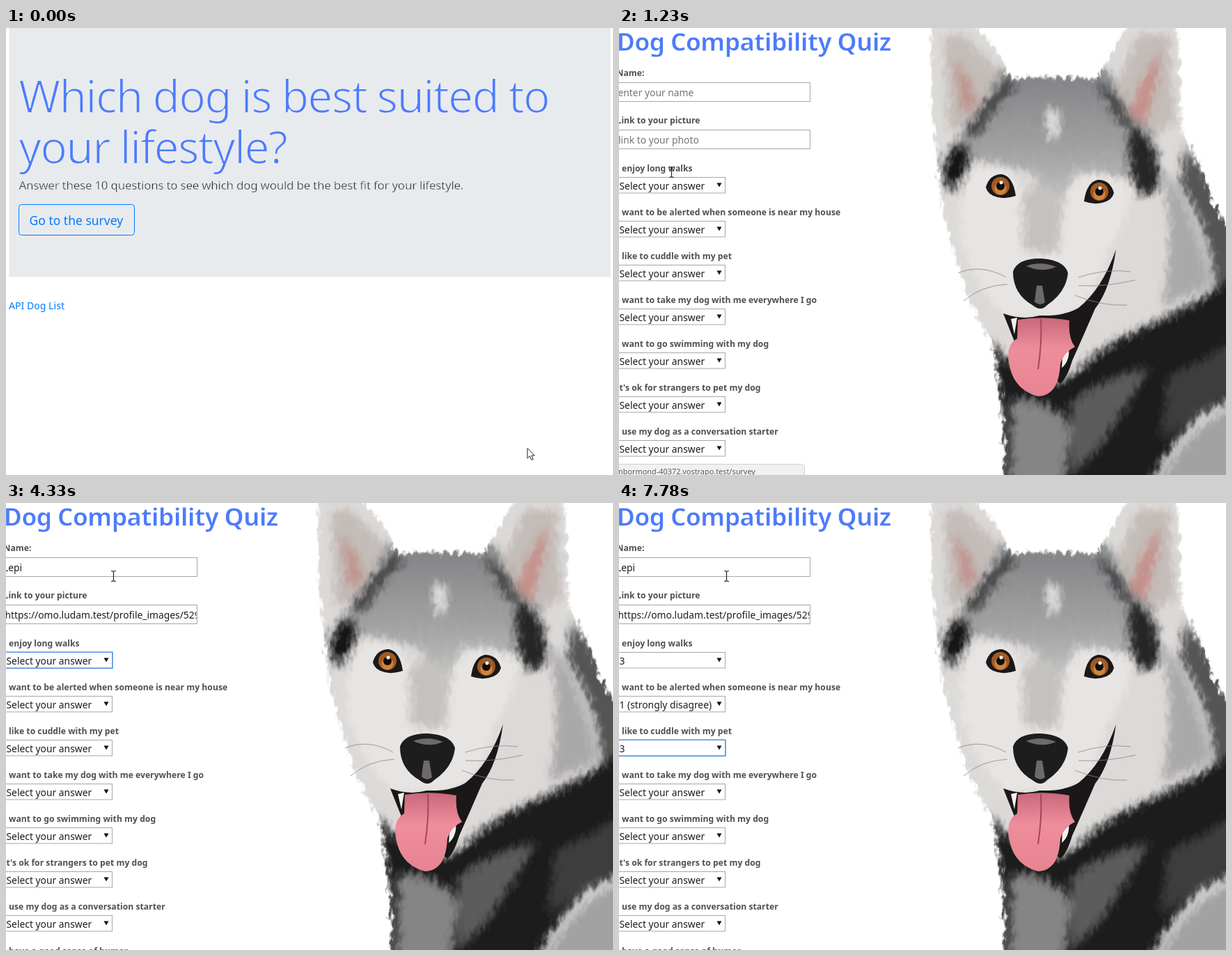
Write an HTML page that moves like this. It is 872 by 642 pixels and loops after 8000 ms.

```html
<!DOCTYPE html>
<html lang="en">
<head>
<meta charset="utf-8">
<title>Dog quiz</title>
<style>
  html, body { margin: 0; width: 100%; height: 100%; overflow: hidden; background: #fff; }
  svg { position: absolute; left: 0; top: 0; width: 872px; height: 642px; }
  text { font-family: "Noto Sans", "Open Sans", sans-serif; white-space: pre; }
  #dog { will-change: transform; }
  /* An outline in the background colour gives the lighter weights. */
  .hero { font-size: 65px; letter-spacing: -2.25px; fill: #4c7bff; stroke: #e8ebee; stroke-width: 2.1; }
  .lead { font-size: 17px; letter-spacing: -.26px; fill: #212529; stroke: #e8ebee; stroke-width: .5; }
  .cta { font-size: 17.5px; }
  .link { font-size: 14.1px; fill: #007bff; }
  .title { font-size: 36px; font-weight: 700; letter-spacing: -.95px; fill: #4c7bfb; stroke: #fff; stroke-width: .9; }
  .label { font-size: 12.2px; font-weight: 700; fill: #505050; }
  .value { font-size: 13.85px; fill: #1c1c1c; }
  .hint { fill: #757575; }
  .status { font-size: 10.9px; fill: #5a5a5a; }
  .box { fill: #fff; stroke: #a6a6a6; }
  .focus { fill: none; stroke: #5b95ea; stroke-width: 1.6; }
</style>
</head>
<body>
<svg id="dog" viewBox="0 0 872 642" data-at="1230 8000">
  <defs>
    <path id="shape" d="M450-20H490Q540 15 563 73Q625 68 689 73Q705 30 745-20H798Q809 60 808 152Q838 190 848 240Q870 285 900 330V680H556Q556 570 537 455Q500 395 485 335Q462 270 456 180Q444 90 450-20Z"/>
    <clipPath id="outline"><use href="#shape"/></clipPath>
    <filter id="fur" filterUnits="userSpaceOnUse" x="420" y="-30" width="490" height="710">
      <feGaussianBlur stdDeviation="1.6" result="soft"/>
      <feTurbulence type="fractalNoise" baseFrequency=".14 .07" numOctaves="3" seed="4"/>
      <feDisplacementMap in="soft" scale="17" xChannelSelector="R" yChannelSelector="G"/>
    </filter>
    <filter id="blur" filterUnits="userSpaceOnUse" x="420" y="-30" width="490" height="710">
      <feGaussianBlur stdDeviation="6"/>
    </filter>
    <linearGradient id="brow" x1="0" y1="0" x2="0" y2="1">
      <stop offset="0" stop-color="#808183"/>
      <stop offset=".5" stop-color="#a2a2a3"/>
      <stop offset="1" stop-color="#d2d0ce"/>
    </linearGradient>
    <linearGradient id="tongue" x1="0" y1="0" x2="0" y2="1">
      <stop offset="0" stop-color="#c9687a"/>
      <stop offset=".4" stop-color="#ee8d9b"/>
      <stop offset="1" stop-color="#e88492"/>
    </linearGradient>
  </defs>
  <g filter="url(#fur)">
    <use href="#shape" fill="#dcdad8"/>
    <g clip-path="url(#outline)"><g filter="url(#blur)">
      <path fill="url(#brow)" d="M550 60H700L770 155L762 222L700 210L655 205L625 290L598 210L545 196L500 190L485 165Z"/>
      <path fill="#c3bcb8" d="M468 10H495L545 60L505 135L472 150Z"/>
      <path fill="#c0938c" d="M478 45Q508 70 514 110L490 125Q492 80 478 45Z"/>
      <path fill="#c3bcb8" d="M745 10H790L798 140L765 150L712 90Z"/>
      <path fill="#c58f88" d="M778 30Q745 80 735 125L754 140Q772 95 778 30Z"/>
      <path fill="#414143" d="M555 72L572 82Q540 115 515 158L492 150Q522 115 555 72Z"/>
      <path fill="#414143" d="M684 76L715 95L745 155L722 140Q700 112 684 76Z"/>
      <path fill="#161617" d="M488 160Q516 172 500 205L482 238Q458 215 470 185Z"/>
      <path fill="#252526" d="M732 140Q780 150 776 232L750 242Q724 210 732 140Z"/>
      <path fill="#f2f0ee" d="M616 118H630L628 158H619Z"/>
      <path fill="#e7e5e3" d="M505 205Q545 180 575 225Q590 280 602 295Q625 260 655 220Q700 190 735 235Q730 280 700 325Q680 400 640 415H560Q520 390 492 310Q485 240 505 205Z"/>
      <path fill="#c4c2c0" d="M580 235Q605 215 640 240L632 322H580Z"/>
      <path fill="#555557" d="M812 170Q850 215 900 310V400L855 370Q850 290 806 225Z"/>
      <path fill="#aaa9a9" d="M780 200Q830 260 850 370L780 400Q800 300 780 200Z"/>
      <path fill="#1b1b1c" d="M900 345Q830 395 765 425Q690 455 650 500Q600 530 530 445Q560 560 546 690H750Q790 570 900 510Z"/>
      <path fill="#858586" d="M566 535Q610 530 650 575L630 690H562Z"/>
      <path fill="#5b5b5c" d="M650 540Q700 500 760 490L690 600L650 640Z"/>
      <path fill="#a2a2a3" d="M900 540Q815 560 755 690H900Z"/>
      <path fill="#3d3d3e" d="M790 500Q840 480 900 440V530Q840 545 780 590Z"/>
    </g></g>
  </g>
  <path fill="#191717" d="M552 410Q580 420 604 413Q640 414 660 402Q694 375 714 318Q706 375 684 403Q668 440 651 478Q644 502 634 511L570 455Z"/>
  <path fill="#f4f1ec" d="M563 418L572 416L568 440ZM638 462Q648 455 646 470Q644 482 636 488Z"/>
  <path fill="url(#tongue)" d="M573 419Q610 413 647 420Q645 445 655 458Q640 465 634 482Q632 528 602 529Q566 520 560 480Q556 455 572 446Z"/>
  <path fill="none" stroke="#a8455b" stroke-width="2" d="M606 418Q608 450 602 490"/>
  <path fill="#1d1d1e" d="M566 350Q572 331 605 331Q640 333 645 352Q642 380 615 398Q606 408 594 398Q566 382 566 350Z"/>
  <path fill="#6f6a69" d="M585 342Q605 334 628 343Q608 352 585 342ZM600 370H608L612 394Q605 400 597 393Z"/>
  <g id="eyes"></g>
  <path fill="none" stroke="#888" stroke-width=".8" d="M558 368Q520 370 495 392M556 358Q520 338 487 352M660 370Q700 372 742 362M655 384Q695 400 730 398M660 358Q700 345 735 350"/>
</svg>

<svg id="page" viewBox="0 0 872 642">
  <defs><clipPath id="field"><path d="M0 140H273.5V180H0Z"/></clipPath></defs>
  <g data-at="0 1230">
    <rect x="4.5" y="-1" width="864" height="358.5" fill="#e8ebee"/>
    <text class="hero" x="18" y="122">Which dog is best suited to</text>
    <text class="hero" x="18" y="195">your lifestyle?</text>
    <text class="lead" x="18.5" y="232">Answer these 10 questions to see which dog would be the best fit for your lifestyle.</text>
    <g id="ring" data-at="930 1230">
      <rect x="17" y="252" width="169" height="47" rx="5" fill="none" stroke="#74b5f7" stroke-width="3"/>
    </g>
    <rect x="18.5" y="253.5" width="166" height="44" rx="4" fill="none" stroke="#007bff"/>
    <text class="cta" x="33.5" y="283" fill="#007bff">Go to the survey</text>
    <g data-at="540 1230">
      <rect x="18" y="253" width="167" height="45" rx="4" fill="#007bff"/>
      <text class="cta" x="33.5" y="283" fill="#fff">Go to the survey</text>
    </g>
    <text class="link" x="4" y="404">API Dog List</text>
  </g>

  <g data-at="1230 8000">
    <text class="title" x="-3.5" y="33">Dog Compatibility Quiz</text>
    <text class="label" x="-3.5" y="69">Name:</text>
    <rect class="box" x="-8.5" y="78.5" width="283" height="27"/>
    <text class="value hint" x="-1.5" y="97.5" data-at="0 2660">enter your name</text>
    <text class="value" id="name" x="-4" y="97.5"></text>
    <rect class="focus" x="-8" y="78.3" width="282.6" height="27.6" data-at="1760 3300"/>
    <text class="label" x="-3.5" y="137">Link to your picture</text>
    <rect class="box" x="-8.5" y="146.5" width="283" height="27"/>
    <text class="value hint" x="-1" y="165.5" data-at="0 3850">link to your photo</text>
    <g clip-path="url(#field)">
      <text class="value" x="-1.5" y="165.5" data-at="3850 8000">https://omo.ludam.test/profile_images/529</text>
    </g>
    <rect class="focus" x="-8" y="146.3" width="282.6" height="27.6" data-at="3300 4330"/>
    <g id="rows"></g>
  </g>

  <g data-at="540 1700">
    <path d="M-1 643V626.5H262Q266.5 626.5 266.5 631V643Z" fill="#f1f1f1" stroke="#d0d0d0"/>
    <text class="status" x="-1" y="641">nbormond-40372.vostrapo.test/survey</text>
  </g>

  <g id="pointer">
    <path data-at="0 540" fill="#fff" stroke="#222" d="M.5.5V15L4 11.8L6.4 17.3L8.8 16.2L6.4 11H11Z"/>
    <path data-at="540 1150" fill="#fff" stroke="#222" d="M-.5 1Q1.5-1 2.5 1V6Q8 6 9.5 8Q11 10 9 16H1L-4 9.5Q-4 7.5-.5 9.5Z"/>
    <path data-at="1150 8000" fill="none" stroke="#222" stroke-width="1.2" d="M-3.5-7.5Q0-7.5 0-6Q0-7.5 3.5-7.5M0-6V6M-3.5 7.5Q0 7.5 0 6Q0 7.5 3.5 7.5"/>
  </g>
</svg>

<script>
const LOOP = 8000, TICK = 610 / 9;
const $ = id => document.getElementById(id);

// Questions are scrolled sideways, so their first letter is cut off.
const questions = [
  [4, 'enjoy long walks'],
  [4, 'want to be alerted when someone is near my house'],
  [4, 'like to cuddle with my pet'],
  [4, 'want to take my dog with me everywhere I go'],
  [4, 'want to go swimming with my dog'],
  [.5, "t's ok for strangers to pet my dog"],
  [4, 'use my dog as a conversation starter'],
  [4, 'have a good sense of humor']
];

// Per row: focus start, answer time, focus end, answer.
const answers = [
  [4330, 6200, 6580, '3'],
  [6580, 7000, 7300, '1 (strongly disagree)'],
  [7300, 7780, LOOP, '3']
];

const value = (y, from, to, text) =>
  `<text class="value" x=".5" y="${y + 17.5}" data-at="${from} ${to}">${text}</text>`;

$('rows').innerHTML = questions.map(([x, text], i) => {
  const y = Math.round(213.5 + i * 63.15) + .5;
  const [focus, pick, blur, answer] = answers[i] || [LOOP, LOOP, LOOP, ''];
  return `<text class="label" x="${x}" y="${y - 9}">${text}</text>
    <rect class="box" x="-8.5" y="${y}" width="161" height="22.5"/>
    ${value(y, 0, pick, 'Select your answer')}${value(y, pick, LOOP, answer)}
    <path d="M140.5 ${y + 8}h7l-3.5 6z" fill="#111"/>
    <rect class="focus" x="-8" y="${y - .3}" width="161" height="23.2" data-at="${focus} ${blur}"/>`;
}).join('');

$('eyes').innerHTML = [[548, 227, 1], [690, 235, -1]].map(([x, y, side]) =>
  `<g transform="translate(${x} ${y})">
    <path transform="scale(${side} 1)" d="M-21 2Q-16-17 2-17Q18-14 22 14Q8 19-4 16Q-18 13-21 2Z" fill="#1b1817"/>
    <circle r="13" fill="#a05a26"/><circle cy="4" r="8.5" fill="#cf8440"/>
    <circle r="6" fill="#100c0a"/><circle cx="1" cy="-5" r="2.5" fill="#fff"/>
  </g>`).join('');

// time, x, y
const path = [
  [0, 748, 603], [280, 420, 380], [480, 170, 240], [680, 96, 266],
  [1080, 96, 266], [1154, 83, 251], [1222, 75, 207], [1440, 104, 150],
  [1760, 148, 104], [1999, 148, 104], [2000, 154, 105], [LOOP, 154, 105]
];

function pointerAt(t) {
  if (t < 70) t = 0;
  else if (t < 1800) t = 70 + Math.floor((t - 70) / TICK) * TICK;
  const i = path.findIndex(p => p[0] > t);
  const [t0, x0, y0] = path[i - 1], [t1, x1, y1] = path[i];
  const k = (t - t0) / (t1 - t0);
  return [Math.round(x0 + (x1 - x0) * k) + .5, Math.round(y0 + (y1 - y0) * k)];
}

const keyTimes = [2660, 2830, 2980, 3130];
const cues = [...document.querySelectorAll('[data-at]')].map(el => [el, ...el.dataset.at.split(' ').map(Number)]);

function draw(t) {
  for (const [el, from, to] of cues) el.style.display = t >= from && t < to ? '' : 'none';
  $('ring').style.opacity = t < 1000 ? .5 : 1;
  $('name').textContent = 'Lepi'.slice(0, keyTimes.filter(k => t >= k).length);
  $('pointer').setAttribute('transform', `translate(${pointerAt(t)})`);
}

const start = performance.now();
function frame() {
  draw((performance.now() - start) % LOOP);
  requestAnimationFrame(frame);
}
frame();
</script>
</body>
</html>
```
